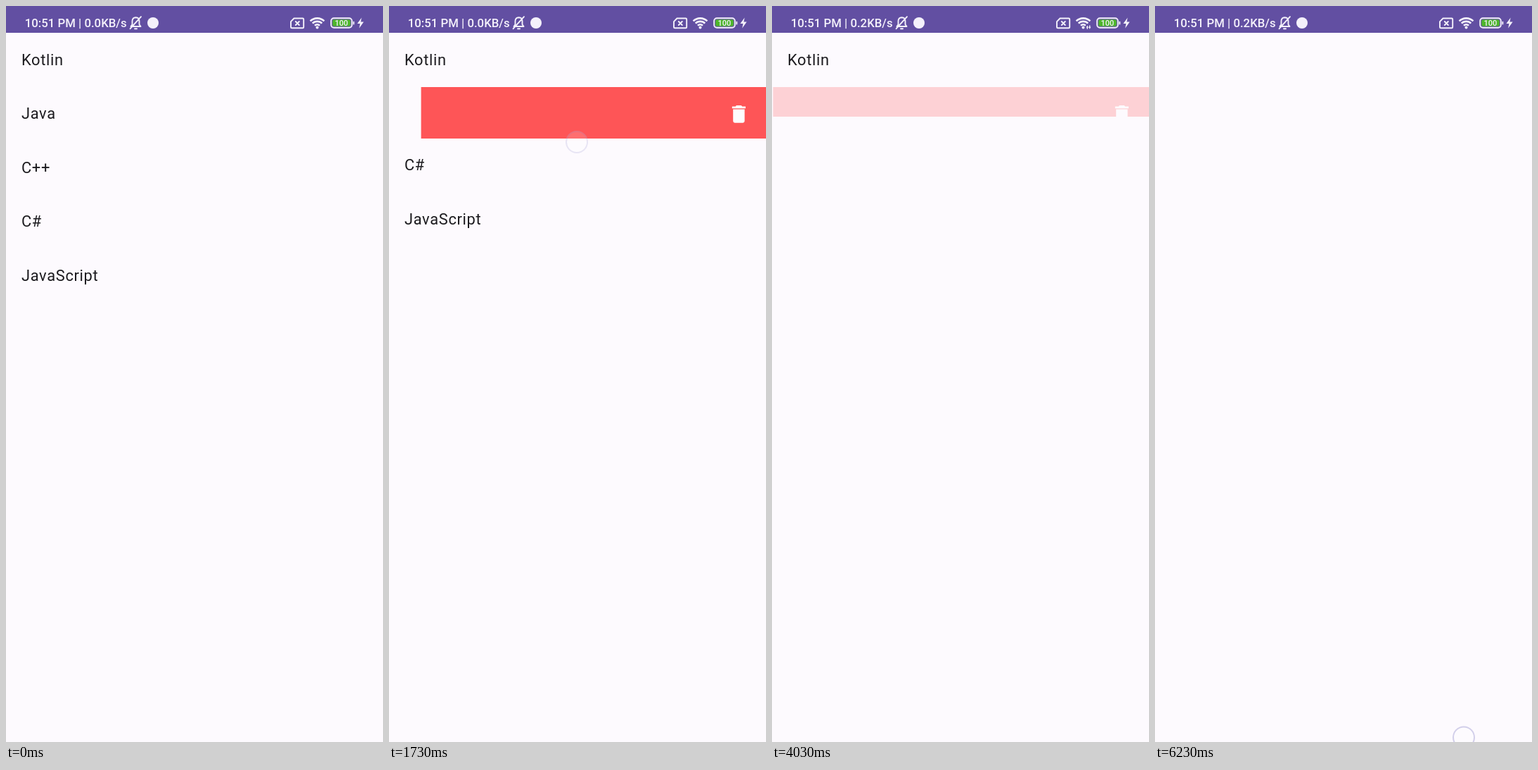
Recreate the animation shown at these times as an HTML page. Size 536 by 1044 pixels, loop 6260 ms.

```html
<!DOCTYPE html>
<html lang="en">
<head>
<meta charset="utf-8">
<title>Swipe to delete</title>
<style>
  html, body { margin: 0; width: 100%; height: 100%; overflow: hidden; background: #fdfafe; }
  #stage { position: relative; width: 536px; height: 1044px; overflow: hidden; background: #fdfafe; }
  #bar { position: absolute; left: 0; top: 0; background: #624fa2; }
  #bar text { font-family: Roboto, sans-serif; font-weight: 500; fill: #f4f1fb; }
  #list { position: absolute; left: 0; top: 38.6px; width: 536px; }
  .row { position: relative; height: 76.5px; overflow: hidden; }
  .under, .item { position: absolute; left: 0; top: 0; width: 536px; height: 76.5px; }
  .under { background: #f00; }
  .under svg { position: absolute; left: 481.3px; top: 21.9px; width: 32.8px; height: 32.8px; fill: #fff; }
  .item {
    box-sizing: border-box; padding-left: 21.9px; background: #fdfafe; color: #1c1b1f;
    font: 400 21.86px/76.5px Roboto, sans-serif; letter-spacing: .68px; white-space: pre;
  }
  #touch {
    position: absolute; left: -16px; top: -16px; width: 32px; height: 32px; box-sizing: border-box;
    border: 2px solid rgba(150, 145, 205, .42); border-radius: 50%; background: rgba(255, 255, 255, .3);
  }
</style>
</head>
<body>
<div id="stage">
  <div id="list"></div>
  <svg id="bar" width="536" height="38" viewBox="0 0 536 38">
    <text x="26.8" y="30" font-size="16.75">10:51 PM | <tspan id="speed">0.0KB/s</tspan></text>
    <g fill="none" stroke="#f4f1fb" stroke-width="1.9" stroke-linejoin="round" stroke-linecap="round">
      <path d="M177.5 29h14l-2-2.8v-4.7q0-5-5-5.3-5 .3-5 5.3v4.7zM183 32.3h3M192 15.2 176.6 32.2"/>
      <path d="M409.5 17.5h12.3q1.4 0 1.4 1.4v11q0 1.4-1.4 1.4h-15.4q-1.4 0-1.4-1.4v-7.7z"/>
      <path d="m411.8 22 5 5m0-5-5 5"/>
      <rect x="462.2" y="17.2" width="29.6" height="13.6" rx="4"/>
    </g>
    <circle cx="209" cy="24" r="8" fill="#f4f1fb"/>
    <g fill="none" stroke="#f4f1fb" stroke-width="2.7">
      <path d="M432.6 21.4a14 14 0 0 1 19.8 0M435.8 24.6a9.5 9.5 0 0 1 13.4 0M439 27.8a5 5 0 0 1 7 0"/>
    </g>
    <circle cx="442.5" cy="30.4" r="2" fill="#f4f1fb"/>
    <g id="traffic">
      <rect x="446.2" y="26.4" width="8" height="7.6" fill="#624fa2"/>
      <path d="M446.6 30.4l1.7-3 1.7 3h-1v2.4h-1.4v-2.4zM450 29.8h1v-2.4h1.4v2.4h1l-1.7 3z" fill="#f4f1fb"/>
    </g>
    <rect x="464.2" y="19.2" width="25.6" height="9.6" rx="2.2" fill="#4db52b"/>
    <rect x="493.4" y="21.8" width="1.9" height="4.6" rx=".9" fill="#f4f1fb"/>
    <text x="477" y="28" font-size="11" text-anchor="middle">100</text>
    <path d="M505.6 16.6 499.4 25h4l-1.2 6.4 6.4-8.8h-4.2z" fill="#f4f1fb"/>
  </svg>
  <div id="touch"></div>
</div>
<script>
const LOOP = 6260, WIDTH = 536, ROW = 76.5;
const SLOP = 11, COLLAPSE_DELAY = 15, COLLAPSE = 500, TOUCH_FADE = 150;

const names = ['Kotlin', 'Java', 'C++', 'C#', 'JavaScript'];

// Finger strokes; those with a row dismiss it on release.
const strokes = [
  { row: 2, from: 30,   to: 405,  x0: 480, y0: 232,  x1: 267, y1: 272 },
  { row: 1, from: 1050, to: 1655, x0: 480, y0: 160,  x1: 267, y1: 193 },
  { row: 3, from: 2650, to: 2787, x0: 480, y0: 165,  x1: 262, y1: 240 },
  { row: 4, from: 3560, to: 3850, x0: 480, y0: 165,  x1: 265, y1: 230 },
  { row: 0, from: 4190, to: 4385, x0: 480, y0: 70,   x1: 265, y1: 136 },
  { from: 5000, to: 5280, x0: 512, y0: 1030, x1: 480, y1: 1026 },
  { from: 5570, to: 5680, x0: 467, y0: 1020, x1: 451, y1: 1023 },
  { from: 6230, to: LOOP, x0: 439, y0: 1037.5, x1: 439, y1: 1037.5 }
];

const $ = id => document.getElementById(id);
const clamp = v => Math.min(1, Math.max(0, v));
const mix = (a, b, u) => a + (b - a) * u;

// cubic-bezier(.4, 0, .2, 1)
function ease(x) {
  let lo = 0, hi = 1, s = x;
  for (let i = 0; i < 24; i++) {
    s = (lo + hi) / 2;
    const bx = 1.2 * s * (1 - s) ** 2 + .6 * s * s * (1 - s) + s ** 3;
    if (bx < x) lo = s; else hi = s;
  }
  return s * s * (3 - 2 * s);
}

// Critically damped spring falling from `gap` to 0
const spring = (gap, slope, omega, sec) => (gap + slope * sec) * Math.exp(-omega * sec);

const rows = names.map(name => {
  const el = document.createElement('div');
  el.className = 'row';
  el.innerHTML = `<div class="under"><svg viewBox="0 0 24 24"><path d="M6 19c0 1.1.9 2 2 2h8c1.1 0 2-.9 2-2V7H6zM19 4h-3.5l-1-1h-5l-1 1H5v2h14z"/></svg></div><div class="item">${name}</div>`;
  $('list').append(el);
  return { el, under: el.firstChild, item: el.lastChild };
});

function finger(s, t) {
  const u = clamp((t - s.from) / (s.to - s.from)) ** 2;
  return { x: mix(s.x0, s.x1, u), y: mix(s.y0, s.y1, u) };
}

function drawRow(s, t) {
  const { el, under, item } = rows[s.row];
  let shift = Math.max(0, s.x0 - finger(s, t).x - SLOP);
  if (t > s.to) shift = WIDTH - spring(WIDTH - shift, 7000, Math.sqrt(1500), (t - s.to) / 1000);
  const gone = Math.max(0, t - s.to - COLLAPSE_DELAY);
  el.style.height = ROW * (1 - ease(clamp(gone / COLLAPSE))) + 'px';
  el.style.opacity = gone < COLLAPSE ? spring(1, 20, 20, gone / 1000) : 0;
  under.style.visibility = shift > 0 ? 'visible' : 'hidden';
  item.style.transform = shift > 0 ? `translateX(${-shift}px)` : 'none';
}

function drawTouch(t) {
  const s = strokes.find(s => t >= s.from && t < s.to + TOUCH_FADE);
  $('touch').style.opacity = s ? 1 - clamp((t - s.to) / TOUCH_FADE) : 0;
  if (!s) return;
  const { x, y } = finger(s, t);
  $('touch').style.transform = `translate(${x}px, ${y}px)`;
}

function draw(t) {
  for (const s of strokes) if ('row' in s) drawRow(s, t);
  drawTouch(t);
  $('speed').textContent = t >= 3600 ? '0.2KB/s' : '0.0KB/s';
  $('traffic').style.opacity = t >= 2370 && t < 6030 ? 1 : 0;
}

const start = performance.now();
function tick() {
  draw((performance.now() - start) % LOOP);
  requestAnimationFrame(tick);
}
tick();
</script>
</body>
</html>
```
